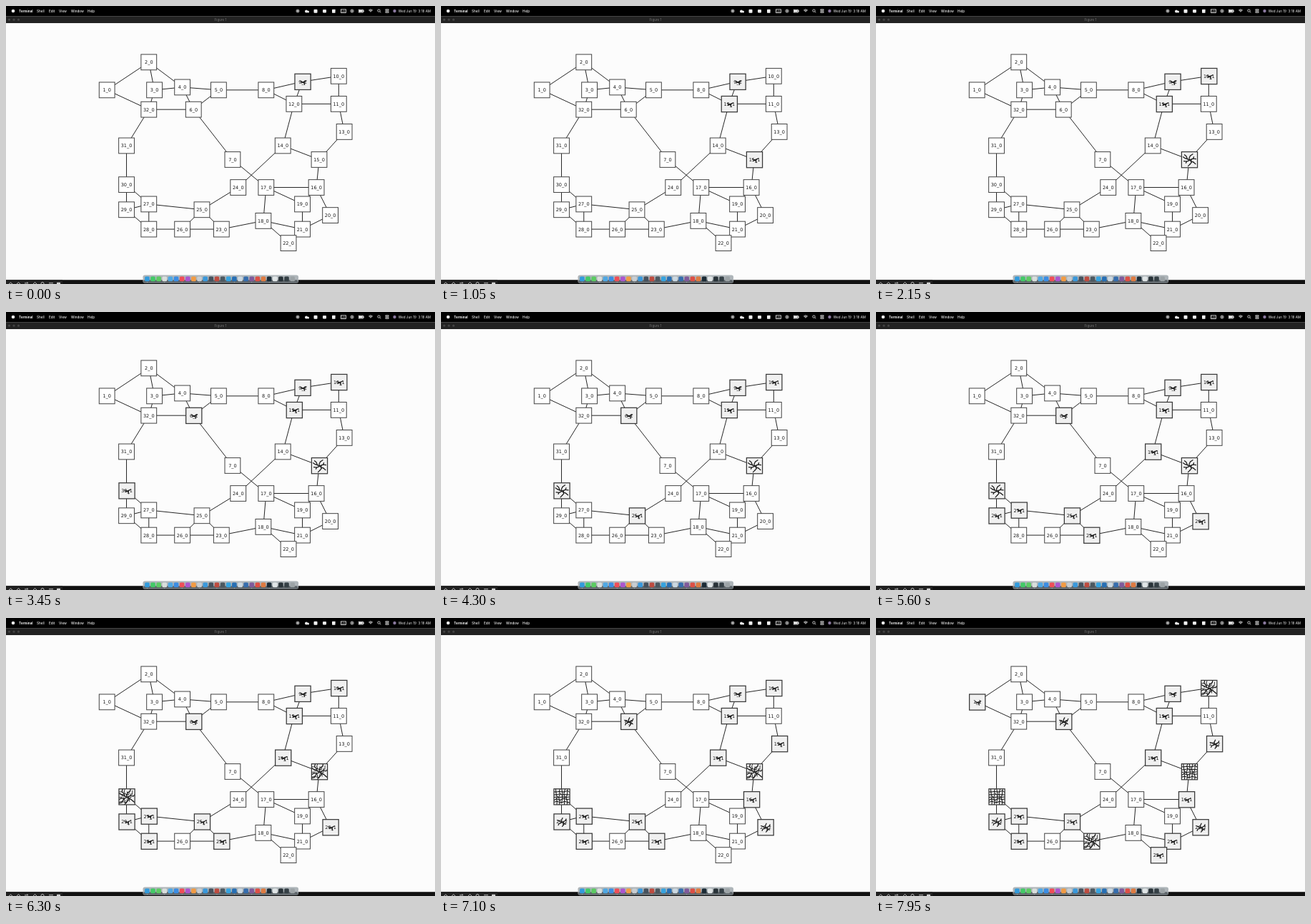
These frames come from a looping animation (600x390 px, 8 s). An HTML page with a canvas:

```html
<!DOCTYPE html>
<html lang="en">
<head>
<meta charset="utf-8">
<title>Network damage</title>
<style>
html, body { margin: 0; width: 100%; height: 100%; overflow: hidden; background: #fcfcfc; }
canvas { display: block; width: 600px; height: 390px; }
</style>
</head>
<body>
<canvas id="stage"></canvas>
<script>
const LOOP = 8000;
const canvas = document.getElementById('stage');
const ctx = canvas.getContext('2d');
const dpr = window.devicePixelRatio || 1;
canvas.width = 600 * dpr;
canvas.height = 390 * dpr;

// Grid cells of nodes 1 to 32
const CELLS = ('0,10 15,0 17,10 27,9 40,10 31,17 45,35 57,10 70,7 83,5 83,15 67,15 85,25 63,30 76,35 75,45 ' +
  '57,45 56,57 70,51 80,55 70,60 65,65 41,60 47,45 34,53 27,60 15,51 15,60 7,53 7,44 7,30 15,17').split(' ');
const nodes = CELLS.map((cell, i) => {
  const [c, r] = cell.split(',').map(Number);
  return { id: i + 1, x: 141.2 + c * 3.905, y: 78.8 + r * 3.905 };
});

const LINKS = ('1-2 1-32 2-3 2-4 3-4 3-32 4-5 4-6 5-6 6-32 5-8 8-9 8-12 9-10 9-12 10-11 11-12 11-13 12-14 ' +
  '13-15 14-15 14-24 6-7 7-17 15-16 16-17 17-19 17-18 16-19 16-20 20-21 19-21 18-21 18-22 18-23 21-22 ' +
  '23-25 25-26 23-26 26-28 25-27 24-25 27-28 27-30 27-29 28-29 29-30 30-31 31-32')
  .split(' ').map(s => s.split('-').map(n => nodes[n - 1]));

// time:node>level
const EVENTS = ('0:9>1 500:12>1 1000:15>1 1300:10>1 1600:15>2 1950:15>3 2900:6>1 3200:30>1 3550:30>2 ' +
  '3800:25>1 4100:30>3 4500:29>1 4750:20>1 5000:23>1 5250:27>1 5450:14>1 5800:15>4 6100:28>1 6200:30>4 ' +
  '6350:29>2 6450:13>1 6550:6>2 6650:16>1 6750:20>2 6850:30>5 7150:10>2 7250:23>2 7350:13>2 7400:10>3 ' +
  '7450:15>5 7550:23>3 7600:21>1 7700:23>4 7750:10>4 7800:1>1 7850:22>1')
  .split(' ').map(s => s.split(/[:>]/).map(Number));

// Crack strokes added at each level, as points around the node centre
const CRACKS = [
  '-3,-1 0,.5 2.5,-.5 5,-1.5|0,.5 2,1.8 2.6,4|0,.5 -1.6,1.6|2.5,-.5 2,1.8',
  '-6,-2 -3,-1|-1.6,1.6 -4,2.5 -5,4.6|0,.5 -.5,-2.5 1,-5.5|2.6,4 .5,6.4|2,1.8 5.5,3.4|5,-1.5 6,-4',
  '-6,-2 -9,-4|-3,-1 -4.5,-5 -7,-7|1,-5.5 4.5,-8|-4,2.5 -8,2|.5,6.4 -2,9|5.5,3.4 8.5,6|5,-1.5 9,-1',
  '-9,-4 -11,-5|-8,2 -11,4|4.5,-8 5,-11|8.5,6 11,8|9,-1 11,-3|-2,9 -3,11|-7,-7 -6,-11|-5,4.6 -7,8 -11,9'
].map(s => s.split('|').map(line => line.split(' ').map(p => p.split(',').map(Number))));

function seeded(seed) {
  return () => (seed = (seed * 16807) % 2147483647) / 2147483647;
}

function makeNet() {
  const rnd = seeded(4127), n = 6, grid = [], net = [];
  for (let r = 0; r <= n; r++) {
    for (let c = 0; c <= n; c++) {
      const jx = c % n ? (rnd() - .5) * 2.6 : 0;
      const jy = r % n ? (rnd() - .5) * 2.6 : 0;
      grid.push([-11 + c * 22 / n + jx, -11 + r * 22 / n + jy]);
    }
  }
  for (let r = 0; r <= n; r++) {
    for (let c = 0; c <= n; c++) {
      const i = r * (n + 1) + c;
      if (c < n && r % n) net.push([grid[i], grid[i + 1]]);
      if (r < n && c % n && rnd() < .85) net.push([grid[i], grid[i + n + 1]]);
    }
  }
  return net.map(line => ({ line, early: rnd() < .3 }));
}
const NET = makeNet();

function box(x, y, w, h, color, radius = 0) {
  ctx.fillStyle = color;
  ctx.beginPath();
  ctx.roundRect(x, y, w, h, radius);
  ctx.fill();
}

function disc(x, y, r, color) {
  ctx.fillStyle = color;
  ctx.beginPath();
  ctx.arc(x, y, r, 0, Math.PI * 2);
  ctx.fill();
}

function ring(x, y, r, from = 0, to = Math.PI * 2) {
  ctx.beginPath();
  ctx.arc(x, y, r, from, to);
  ctx.stroke();
}

function trace(points) {
  ctx.beginPath();
  points.forEach(([x, y], i) => i ? ctx.lineTo(x, y) : ctx.moveTo(x, y));
  ctx.stroke();
}

function label(text, x, y, font, color, align = 'left') {
  ctx.font = font;
  ctx.fillStyle = color;
  ctx.textAlign = align;
  ctx.fillText(text, x, y);
}

function pen(color, width) {
  ctx.strokeStyle = color;
  ctx.lineWidth = width;
}

function drawCracks(level) {
  ctx.lineJoin = ctx.lineCap = 'round';
  pen('#1c1c1c', level < 5 ? 1.25 : 1.05);
  if (level < 5) CRACKS.slice(0, level).flat().forEach(trace);
  if (level > 3) {
    if (level === 4) ctx.lineWidth = .85;
    NET.forEach(({ line, early }) => { if (level > 4 || early) trace(line); });
  }
  ctx.lineCap = 'butt';
  ctx.lineJoin = 'miter';
}

function drawNode(node, level) {
  ctx.save();
  ctx.translate(node.x, node.y);
  if (level) ctx.translate(.5, .2);
  const half = level ? 11.1 : 10.9;
  box(-half, -half, half * 2, half * 2, level ? '#f0f0f0' : '#ffffff');
  if (level < 3) label(`${node.id}_${level}`, 0, 2.4, '6.5px "DejaVu Sans", sans-serif', '#181818', 'center');
  if (level) {
    ctx.save();
    ctx.beginPath();
    ctx.rect(-half, -half, half * 2, half * 2);
    ctx.clip();
    drawCracks(level);
    ctx.restore();
  }
  pen(level ? '#383838' : '#424242', level ? 1.25 : 1);
  ctx.strokeRect(-half, -half, half * 2, half * 2);
  ctx.restore();
}

function drawMenuBar() {
  const white = '#f2f2f2', font = '4.6px Inter, sans-serif';
  box(0, 0, 600, 14.5, '#000000');
  disc(10, 7, 2.3, white);
  label('Terminal', 18, 8.8, 'bold ' + font, white);
  [['Shell', 43], ['Edit', 60], ['View', 74], ['Window', 91], ['Help', 114]]
    .forEach(([text, x]) => label(text, x, 8.8, '500 ' + font, white));
  label('Wed Jun 19  3:18 AM', 594, 8.8, font, white, 'right');

  pen(white, .8);
  ring(408, 7, 2);
  disc(408, 7, 1, white);
  disc(420, 7.5, 2, white);
  disc(422.5, 8, 1.5, white);
  box(430.5, 4.7, 5, 5, white, 1);
  box(443, 5, 5, 4.4, white, .8);
  box(456, 4.7, 4.6, 5, white, .6);
  ctx.strokeRect(468.5, 4.8, 7, 4.6);
  label('US', 472, 8.5, '3.5px Inter, sans-serif', white, 'center');
  ring(484, 7, 2.1);
  trace([[483, 6], [485, 7], [483, 8]]);
  ctx.strokeRect(493.5, 5.2, 6, 3.8);
  box(494, 5.7, 4.7, 2.8, white);
  box(500, 6.3, .8, 1.6, white);
  [1.4, 2.8, 4.1].forEach(r => ring(510, 9, r, -2.35, -.8));
  ring(521.5, 6.5, 1.7);
  trace([[522.8, 7.8], [524.2, 9.2]]);
  ctx.strokeRect(531, 4.8, 4, 1.4);
  ctx.strokeRect(531, 7.8, 4, 1.4);
  disc(543.5, 7, 2.2, '#8a789e');
}

function drawWindow() {
  box(0, 14.5, 600, 9.5, '#222222');
  [4.5, 11, 17.5].forEach(x => disc(x, 19.2, 1.6, '#434343'));
  label('Figure 1', 300, 20.9, '4.6px Inter, sans-serif', '#757575', 'center');
  box(0, 384.3, 600, 5.7, '#111111');
  box(0, 384.3, 79, 5.7, '#202020');
  pen('#d0d0d0', .9);
  trace([[4, 390], [6.5, 388], [9, 390]]);
  trace([[15, 390], [17.5, 387.7], [20, 390]]);
  trace([[26, 388.8], [31, 388.8], [29.5, 387.5]]);
  trace([[38, 390], [40.5, 387.5], [43, 390]]);
  ring(51, 389.5, 2);
  trace([[60, 388.7], [66, 388.7]]);
  box(71, 387.7, 5, 3, '#d0d0d0', .5);
}

const DOCK = ('#329bdc #42ca67 #5bcb62 #d9dedb #4fa8e3 #3b8de4 #ef4e58 #ac55cf #f29b43 #c8cdd1 #3998db #46515d ' +
  '#bd4c40 #4c5860 #36a3df #276fb4 #cbd8e1 #356dad #805a9b #dd4f45 #de7b41 #1b2b36 #e0e5e6 #283238 #354046 #9ca3a6').split(' ');

function drawDock() {
  box(191.5, 377.5, 217.5, 11.3, '#aeb5b9', 2.8);
  box(192, 384.3, 216.5, 4.1, 'rgba(35,42,48,.55)', 2);
  DOCK.forEach((color, i) => box(194.1 + i * 8.13, 379.5, 6.6, 6.8, color, 1.6));
  for (let i = 0; i < 22; i += 3) disc(197.4 + i * 8.13, 387.6, .45, '#e6e6e6');
}

function render(time) {
  const levels = {};
  EVENTS.forEach(([at, id, level]) => { if (time >= at) levels[id] = level; });
  ctx.setTransform(dpr, 0, 0, dpr, 0, 0);
  box(0, 0, 600, 390, '#fcfcfc');
  pen('#252525', 1);
  LINKS.forEach(([a, b]) => trace([[a.x, a.y], [b.x, b.y]]));
  nodes.forEach(node => drawNode(node, levels[node.id] || 0));
  drawWindow();
  drawMenuBar();
  drawDock();
}

const start = performance.now();
function tick() {
  render((performance.now() - start) % LOOP);
  requestAnimationFrame(tick);
}
tick();
</script>
</body>
</html>
```
